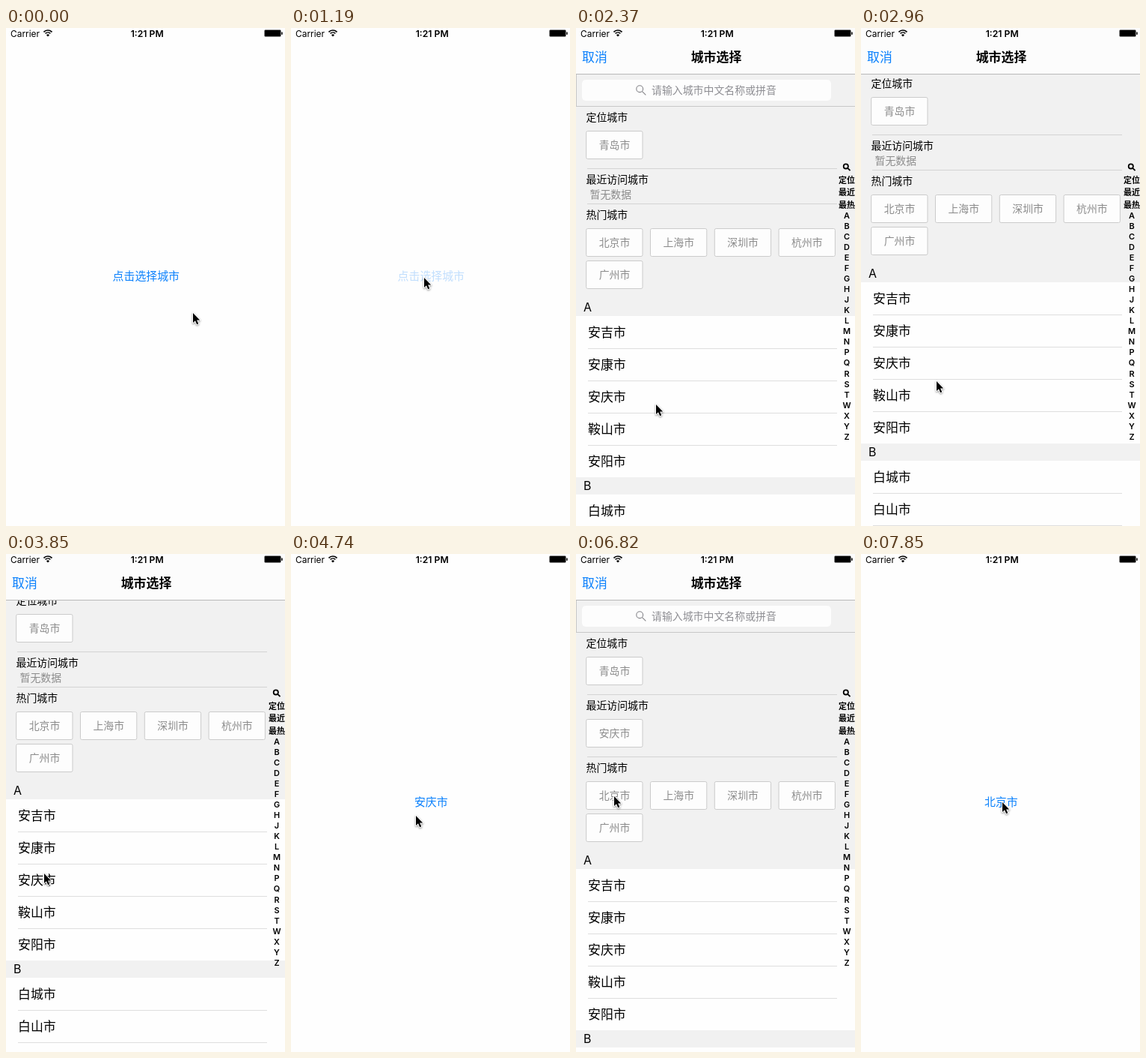
Recreate the animation shown at these times as an HTML page with a canvas. Size 373x664 px, loop 8000 ms.

```html
<!DOCTYPE html>
<html lang="zh-CN">
<head>
<meta charset="utf-8">
<title>城市选择</title>
<style>
html, body { margin: 0; width: 100%; height: 100%; overflow: hidden; background: #fefefe; }
canvas { display: block; width: 373px; height: 664px; }
</style>
</head>
<body>
<canvas id="stage"></canvas>
<script>
const W = 373, H = 664, LOOP = 8000, STEP = LOOP / 54;
const POINT = W / 375; // the phone screen is 375 points wide
const BLUE = '#0a80fc', GRAY = '#8c8c8c', PANEL = '#f1f1f1', PAPER = '#fefefe', LINE = '#d4d4d4';
const FONT = '"Noto Sans CJK SC", "Noto Sans CJK", sans-serif';
const LATIN = 'Inter, Roboto, sans-serif';

const canvas = document.getElementById('stage');
const ctx = canvas.getContext('2d');
const dpr = window.devicePixelRatio || 1;
canvas.width = W * dpr;
canvas.height = H * dpr;

// [time, x, y] of the pointer tip
const pointerKeys = [
  [0, 250, 380], [1037, 182, 332], [1190, 178, 333], [1630, 172, 340],
  [2100, 130, 449], [2440, 101, 516], [2963, 101, 471], [3111, 101, 459],
  [3259, 101, 459], [3852, 51, 426], [4080, 51, 426], [4741, 167, 349],
  [5000, 172, 334], [5600, 165, 334], [6500, 60, 326], [6820, 51, 323],
  [6950, 51, 323], [7550, 196, 331], [7852, 189, 331]
];
const scrollKeys = [[2440, 0], [2963, 45], [3111, 57]];
const visits = [
  { open: 1222, close: 4100, recent: null },
  { open: 5138, close: 6990, recent: '安庆市' }
];
const presses = [[1060, 1230], [4980, 5140]];

function keyed(keys, t, i = 1) {
  if (t <= keys[0][0]) return keys[0][i];
  for (let k = 1; k < keys.length; k++) {
    const a = keys[k - 1], b = keys[k];
    if (t < b[0]) return a[i] + (b[i] - a[i]) * (t - a[0]) / (b[0] - a[0]);
  }
  return keys[keys.length - 1][i];
}

// Critically damped spring: 1 at rest, falling to 0
function spring(ms) {
  const u = Math.max(0, ms) * Math.sqrt(1000 / 3) / 1000;
  return (1 + u) * Math.exp(-u);
}

function rect(x, y, w, h, color) {
  ctx.fillStyle = color;
  ctx.fillRect(x, y, w, h);
}

function text(str, x, cy, size, color = '#000', align = 'left', weight = 400, family = FONT) {
  ctx.font = `${weight} ${size * POINT}px ${family}`;
  ctx.textAlign = align;
  ctx.fillStyle = color;
  ctx.fillText(str, x, cy + size * 0.37);
}

function roundBox(x, y, w, h, r, fill, stroke) {
  ctx.beginPath();
  ctx.roundRect(x, y, w, h, r);
  ctx.fillStyle = fill;
  ctx.fill();
  if (!stroke) return;
  ctx.strokeStyle = stroke;
  ctx.lineWidth = 1;
  ctx.stroke();
}

function magnifier(x, y, r, width, color) {
  ctx.strokeStyle = color;
  ctx.lineWidth = width;
  ctx.beginPath();
  ctx.arc(x, y, r, 0, Math.PI * 2);
  ctx.moveTo(x + r * 0.72, y + r * 0.72);
  ctx.lineTo(x + r * 1.85, y + r * 1.85);
  ctx.stroke();
}

function cityBoxes(names, y) {
  names.forEach((name, i) => {
    const x = 13.5 + (i % 4) * 85.8, top = y + Math.floor(i / 4) * 43;
    roundBox(x + 0.2, top + 0.5, 75.3, 37, 2, '#fdfdfd', '#cbcbcb');
    text(name, x + 38, top + 19, 14, GRAY, 'center');
  });
}

function section(letter, names, y) {
  rect(0, y, W, 23, PANEL);
  text(letter, 10, y + 11.5, 16, '#000', 'left', 400, LATIN);
  names.forEach((name, i) => {
    const top = y + 23 + i * 43;
    rect(0, top, W, 43, PAPER);
    text(name, 16, top + 21.5, 17);
    if (i > 0) rect(16, top, 333, 1, '#dedede');
  });
  return y + 23 + names.length * 43;
}

function table(recent) {
  rect(0, 61, W, 360, PANEL);
  ctx.strokeStyle = '#c8c8c8';
  ctx.lineWidth = 1;
  ctx.strokeRect(0.5, 61.5, W, 43);
  roundBox(8, 69, 333, 28, 5, '#fdfdfd');
  magnifier(85.2, 81.2, 4.4, 1.1, '#85858a');
  text('请输入城市中文名称或拼音', 101, 83, 14, '#8e8e93');

  text('定位城市', 13.5, 118.5, 14);
  cityBoxes(['青岛市'], 137);
  rect(15, 187, 334, 1, LINE);
  text('最近访问城市', 13.5, 201.5, 14);
  if (recent) cityBoxes([recent], 220);
  else text('暂无数据', 18.5, 221.5, 14, GRAY);

  const y = recent ? 270 : 234;
  rect(15, y, 334, 1, LINE);
  text('热门城市', 13.5, y + 14.5, 14);
  cityBoxes(['北京市', '上海市', '深圳市', '杭州市', '广州市'], y + 33);
  const next = section('A', ['安吉市', '安康市', '安庆市', '鞍山市', '安阳市'], y + 127);
  section('B', ['白城市', '白山市', '白银市'], next);
}

function indexBar() {
  magnifier(360.8, 184.4, 3.1, 1.8, '#000');
  ['定位', '最近', '最热'].forEach((s, i) => text(s, 362, 203 + i * 16.3, 11, '#000', 'center', 700));
  [...'ABCDEFGHJKLMNPQRSTWXYZ'].forEach((c, i) =>
    text(c, 362, 250 + i * 14.03, 11, '#000', 'center', 600, LATIN));
}

function picker(offset, scroll, recent) {
  ctx.save();
  ctx.translate(0, Math.round(offset));
  rect(0, 0, W, H, PAPER);
  ctx.save();
  ctx.beginPath();
  ctx.rect(0, 61, W, H);
  ctx.clip();
  ctx.translate(0, -Math.round(scroll));
  table(recent);
  ctx.restore();
  indexBar();
  rect(0, 0, W, 61, '#fcfcfc');
  rect(0, 61, W, 1, '#b9b9b9');
  text('取消', 8, 39, 17, BLUE);
  text('城市选择', 187.5, 39, 17, '#000', 'center', 700);
  ctx.restore();
}

function statusBar() {
  text('Carrier', 6, 7.2, 12, '#000', 'left', 400, LATIN);
  text('1:21 PM', 188.7, 7.2, 12.3, '#000', 'center', 600, LATIN);
  ctx.strokeStyle = '#000';
  ctx.lineWidth = 1.7;
  for (const r of [4.6, 7.6]) {
    ctx.beginPath();
    ctx.arc(56, 10.6, r, -Math.PI * 0.76, -Math.PI * 0.24);
    ctx.stroke();
  }
  ctx.beginPath();
  ctx.moveTo(56, 11.4);
  ctx.arc(56, 11.4, 2.9, -Math.PI * 0.75, -Math.PI * 0.25);
  ctx.fillStyle = '#000';
  ctx.fill();
  roundBox(345.5, 2.5, 22, 9, 1.5, PAPER, '#8a8a8a');
  rect(346, 3, 21, 8, '#000');
  roundBox(368.2, 5.3, 1.5, 3.6, 0.7, '#000');
}

function pointer(x, y) {
  const arrow = new Path2D('M0 0V13L3 10.3L5.2 15.2L7.3 14.3L5.1 9.6H9.2Z');
  ctx.save();
  ctx.translate(x, y);
  ctx.lineJoin = 'round';
  ctx.lineWidth = 2;
  ctx.strokeStyle = '#fff';
  ctx.shadowColor = 'rgba(0,0,0,.45)';
  ctx.shadowBlur = 2.5 * dpr;
  ctx.shadowOffsetY = dpr;
  ctx.stroke(arrow);
  ctx.shadowColor = 'transparent';
  ctx.fillStyle = '#000';
  ctx.fill(arrow);
  ctx.restore();
}

function draw(t) {
  ctx.setTransform(dpr, 0, 0, dpr, 0, 0);
  rect(0, 0, W, H, PAPER);

  const label = t < 4000 ? '点击选择城市' : t < 6960 ? '安庆市' : '北京市';
  const pressed = presses.some(([a, b]) => t >= a && t < b);
  ctx.globalAlpha = pressed ? 0.25 : 1;
  text(label, 187.3, 330.5, 15, BLUE, 'center');
  ctx.globalAlpha = 1;

  for (const v of visits) {
    const offset = t < v.close ? H * spring(t - v.open) : H * (1 - spring(t - v.close));
    if (t > v.open && offset < H - 1) picker(offset, v.recent ? 0 : keyed(scrollKeys, t), v.recent);
  }
  statusBar();
  const hidden = t > 5400 && t < 5560;
  if (!hidden) pointer(Math.round(keyed(pointerKeys, t)), Math.round(keyed(pointerKeys, t, 2)));
}

function tick() {
  const t = performance.now() % LOOP;
  draw(Math.floor((t + 6) / STEP) % 54 * STEP);
  requestAnimationFrame(tick);
}
tick();
</script>
</body>
</html>
```
